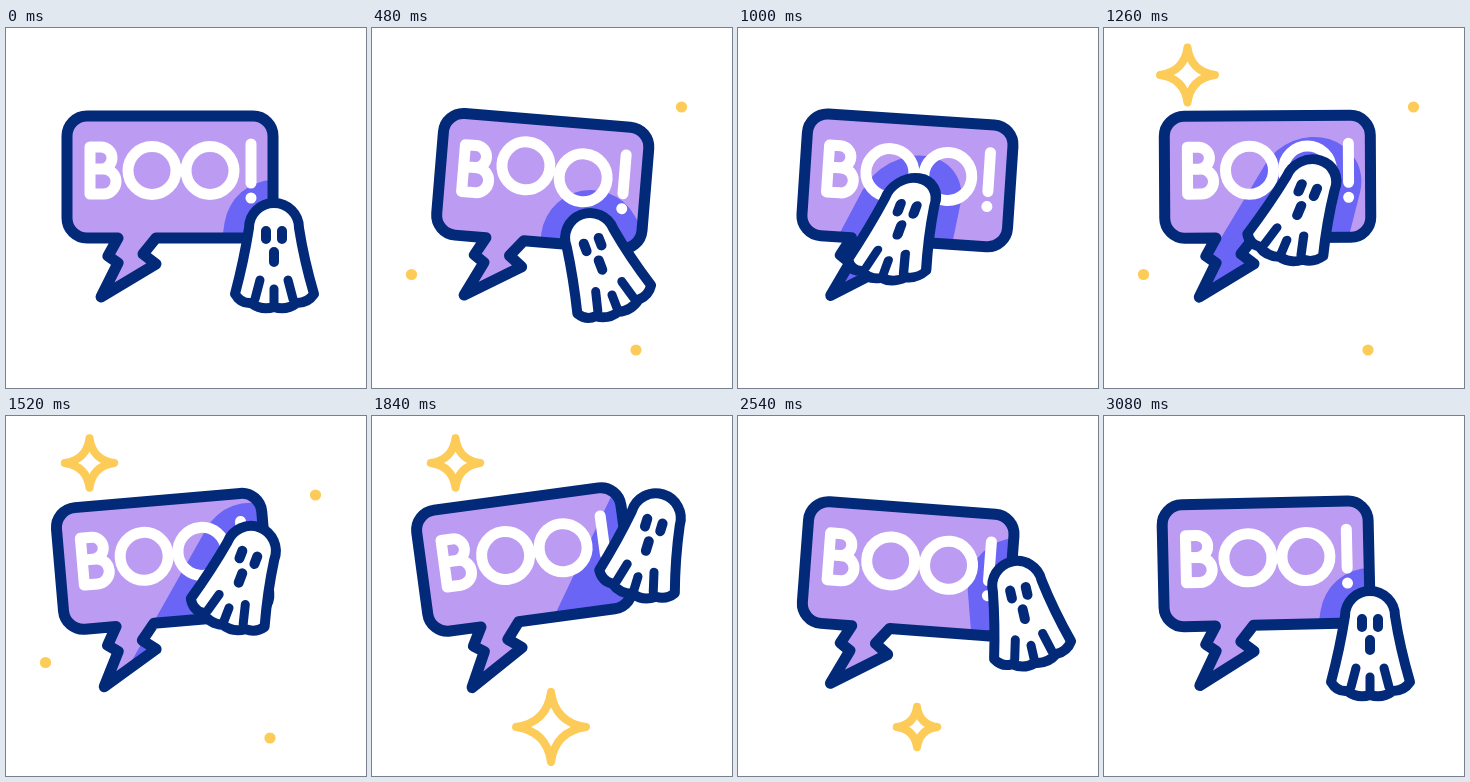
An HTML page for the animation above (3100 ms loop, 360 by 360 pixels).

```html
<!DOCTYPE html>
<html lang="en">
<head>
<meta charset="utf-8">
<title>Boo</title>
<style>
  html, body { margin: 0; width: 100%; height: 100%; overflow: hidden; background: #fff; }
  svg { display: block; width: 100vw; height: 100vh; }
  .line { fill: none; stroke-linecap: round; stroke-linejoin: round; }
  .navy { stroke: #022a78; }
  .white { stroke: #fff; stroke-width: 11; }
  .gold { stroke: #fdcb58; stroke-width: 8; }
</style>
</head>
<body>
<svg viewBox="0 0 360 360" role="img" aria-label="BOO!">
  <defs>
    <path id="bubble" d="M81 88H247A20 20 0 0 1 267 108V190A20 20 0 0 1 247 210H150L137 226L150 236L95 269L112 235L102 228L112 210H81A20 20 0 0 1 61 190V108A20 20 0 0 1 81 88Z"/>
    <path id="star" vector-effect="non-scaling-stroke" d="M0-1Q.12-.12 1 0Q.12 .12 0 1Q-.12 .12-1 0Q-.12-.12 0-1Z"/>
    <clipPath id="inside"><use id="clipShape" href="#bubble"/></clipPath>
  </defs>

  <g id="dots" fill="#fdcb58">
    <circle cx="309.5" cy="79"/>
    <circle cx="39.5" cy="246.5"/>
    <circle cx="264" cy="322"/>
  </g>
  <use class="line gold" href="#star" id="starTop"/>
  <use class="line gold" href="#star" id="starLow"/>

  <g clip-path="url(#inside)">
    <rect width="360" height="360" fill="#bc9bf3"/>
    <path id="halo" fill="#6b65f6" d="M-74 130L-49.5-35A50 50 0 0 1 49.5-35L74 130Z"/>
  </g>
  <g id="speech">
    <use href="#bubble" class="line navy" stroke-width="11"/>
    <g id="letters" class="line white">
      <path d="M84 119V166M84 119H95A11 11 0 0 1 95 141H84M95 141H97.5A12.5 12.5 0 0 1 97.5 166H84"/>
      <circle cx="146" cy="142.500" r="24"/>
      <circle cx="204" cy="142.500" r="24"/>
      <path d="M245 116V155M245 170V170.010"/>
    </g>
  </g>

  <g id="ghost" class="line navy">
    <path fill="#fff" stroke-width="10" d="M-25-30A25 25 0 0 1 25-30Q30 2 40 36Q34 45 23 45Q12 53 0 49Q-12 53-23 45Q-33 46-39 36Q-30 2-25-30Z"/>
    <path stroke-width="10" d="M-8-27V-19M8-27V-19M0-6V4"/>
    <path stroke-width="9" d="M-14 22L-19 41M0 31V46M14 22L19 41"/>
  </g>
</svg>

<script>
const LOOP = 3100;
const $ = id => document.getElementById(id);

// Rows: time, then one value per channel.
const TILT = [
  [0, 0], [100, 0], [480, 4.7], [740, 5.1], [1000, 3.8],
  [1520, -4.9], [1840, -7.7], [2540, 4.3], [3080, -1.3]
];
// x, y, rotation, skew
const GHOST = [
  [0, 268, 230, 0, 0],
  [100, 268, 230, 0, 0],
  [480, 229, 238, -21, 0],
  [780, 166, 224, -8, 0],
  [880, 153, 213, 1, -5],
  [1000, 161, 203, 8, -12],
  [1520, 234, 163, 21, 0],
  [1840, 275, 131, 17, 0],
  [2160, 285, 148, 0, 0],
  [2540, 286, 199, -13, 0],
  [2720, 273, 222, -5, 0],
  [3080, 266, 230, 0, 0]
];
const STAR = [[0, 0], [220, 1], [500, .9], [660, 1], [820, .9], [880, .88], [1040, 0]];

// Monotone cubic: smooth, and never passes the key values.
function slope(keys, i, c) {
  if (i < 1 || i > keys.length - 2) return 0;
  const rate = j => (keys[j + 1][c] - keys[j][c]) / (keys[j + 1][0] - keys[j][0]);
  const a = rate(i - 1), b = rate(i);
  return a * b > 0 ? 2 * a * b / (a + b) : 0;
}

function sample(keys, t, c = 1) {
  const last = keys.length - 1;
  if (t <= keys[0][0]) return keys[0][c];
  if (t >= keys[last][0]) return keys[last][c];
  const i = keys.findIndex(k => k[0] > t) - 1;
  const [p, q] = [keys[i], keys[i + 1]];
  const d = q[0] - p[0], u = (t - p[0]) / d, v = 1 - u;
  return p[c] * (1 + 2 * u) * v * v + q[c] * u * u * (3 - 2 * u)
    + d * u * v * (v * slope(keys, i, c) - u * slope(keys, i + 1, c));
}

const move = (el, value) => el.setAttribute('transform', value);
const letters = [...$('letters').children];
const dots = [...$('dots').children];

function drawStar(el, x, y, size, t) {
  const s = sample(STAR, t) * size;
  el.style.display = s > .3 ? '' : 'none';
  move(el, `translate(${x} ${y}) scale(${s})`);
}

function draw(t) {
  const tilt = `rotate(${sample(TILT, t)} 117 233)`;
  move($('speech'), tilt);
  move($('clipShape'), tilt);

  const [x, y, r, k] = [1, 2, 3, 4].map(c => sample(GHOST, t, c));
  const pose = `translate(${x} ${y}) rotate(${r}) skewX(${k})`;
  move($('ghost'), pose);
  move($('halo'), pose);

  // The letters hop one after another.
  letters.forEach((el, i) => {
    const u = (t - 190 - i * 140) / 280;
    const hop = u > 0 && u < 1 ? 7.5 * Math.sin(Math.PI * u) ** 2 : 0;
    move(el, `translate(0 ${-hop})`);
  });

  // Dots pop in and out three times.
  const off = Math.min(...[480, 1380, 2280].map(c => Math.abs(t - c)));
  const radius = 5.6 * Math.max(0, Math.min(1, (220 - off) / 60));
  dots.forEach(d => d.setAttribute('r', radius));

  drawStar($('starTop'), 83.5, 47, 27.5, t - 1020);
  drawStar($('starLow'), 179, 311, 35, t - 1600);
}

const start = performance.now();
function tick() {
  draw((performance.now() - start) % LOOP);
  requestAnimationFrame(tick);
}
tick();
</script>
</body>
</html>
```
